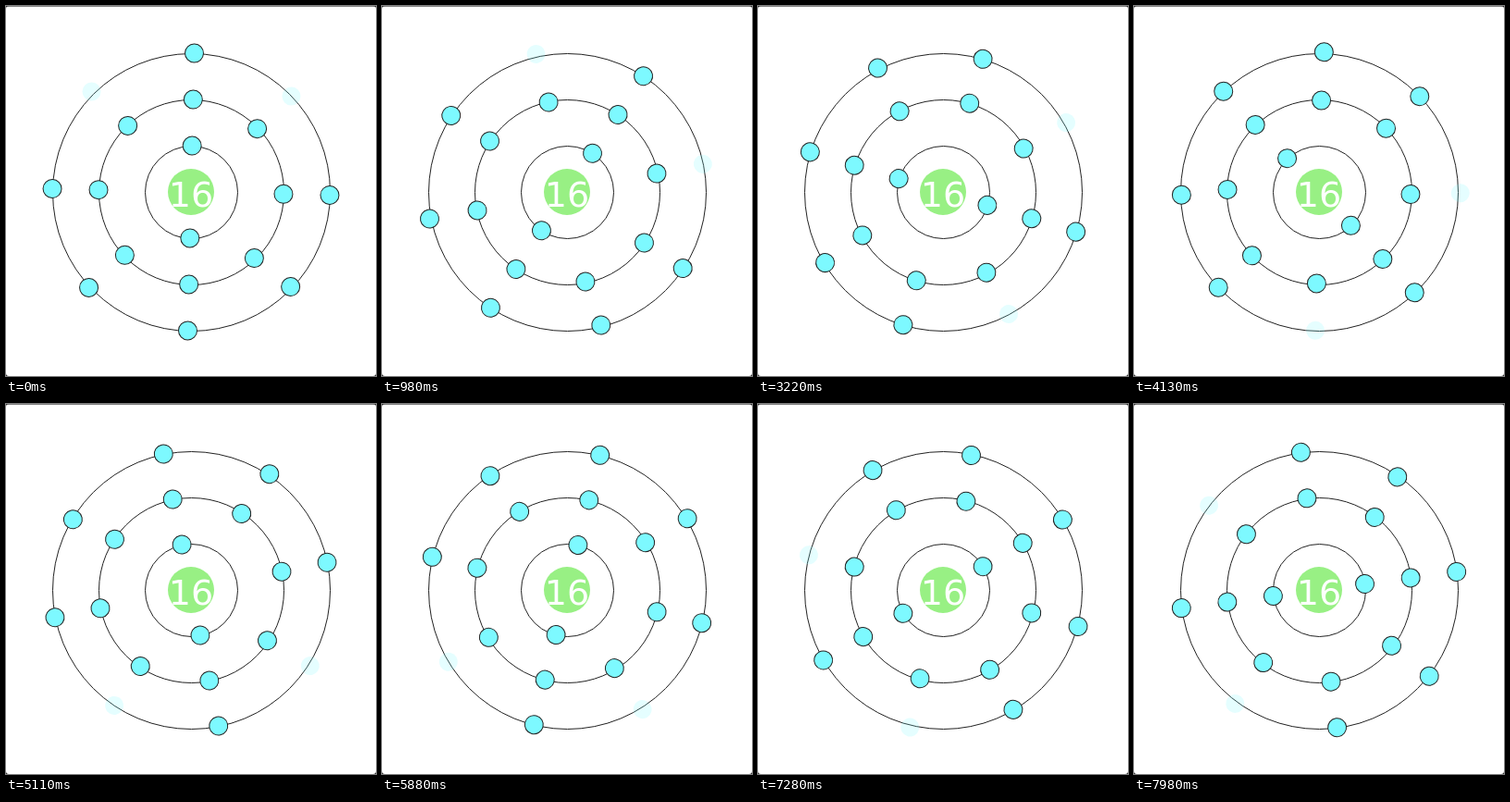
These frames come from a looping animation (400x400 px, 8000 ms). An HTML page:

```html
<!DOCTYPE html>
<html lang="en">
<head>
<meta charset="utf-8">
<title>Electron shells</title>
<style>
  html, body { margin: 0; width: 100%; height: 100%; overflow: hidden; background: #fff; }
  svg { display: block; width: 100vw; height: 100vh; }
  .ring { fill: none; stroke: #222; stroke-width: 1; }
  .electron { fill: #7df9ff; stroke: #222; stroke-width: 1; }
  .vacancy { fill: #7df9ff; opacity: .2; }
  .nucleus { fill: #98f084; }
  text { font: 38px "DejaVu Sans", sans-serif; fill: #fff; text-anchor: middle; }
</style>
</head>
<body>
<svg viewBox="0 0 400 400">
  <path d="M0 .5H400" stroke="#888"/>
  <path d="M0 0h3Q0 0 0 3zM400 0v3Q400 0 397 0zM0 400v-3Q0 400 3 400zM400 400h-3Q400 400 400 397z" fill="#222"/>
  <circle class="ring" cx="200.5" cy="201.5" r="50"/>
  <circle class="ring" cx="200.5" cy="201.5" r="100"/>
  <circle class="ring" cx="200.5" cy="201.5" r="150"/>
  <circle class="nucleus" cx="200" cy="201" r="25"/>
  <text x="200" y="217">16</text>
  <g id="electrons"></g>
</svg>
<script>
  const LOOP = 8000, STEP = 70, TURN = 11000, START_ANGLE = 1.33;
  const group = document.getElementById('electrons');

  function addElectron([x, y], kind = 'electron') {
    const dot = document.createElementNS('http://www.w3.org/2000/svg', 'circle');
    dot.setAttribute('class', kind);
    dot.setAttribute('cx', x);
    dot.setAttribute('cy', y);
    dot.setAttribute('r', 10);
    group.append(dot);
  }

  const axis = r => [[0, -r], [r, 0], [0, r], [-r, 0]];
  const diagonal = d => [[d, -d], [d, d], [-d, d], [-d, -d]];

  const inner = [[0, -50], [0, 50]];
  const middle = [...axis(100), ...diagonal(70)];
  const outer = [...axis(150), [110, 100], [-108, 106]];
  [...inner, ...middle, ...outer].forEach(p => addElectron(p));
  [[106, -106], [-110, -106]].forEach(p => addElectron(p, 'vacancy'));

  const origin = performance.now();
  function draw(now) {
    const time = Math.max(0, now - origin) % LOOP;
    const held = Math.floor(time / STEP) * STEP;
    const angle = START_ANGLE + held / TURN * 360;
    group.setAttribute('transform', `translate(200 201) rotate(${angle})`);
    requestAnimationFrame(draw);
  }
  draw(origin);
</script>
</body>
</html>
```
